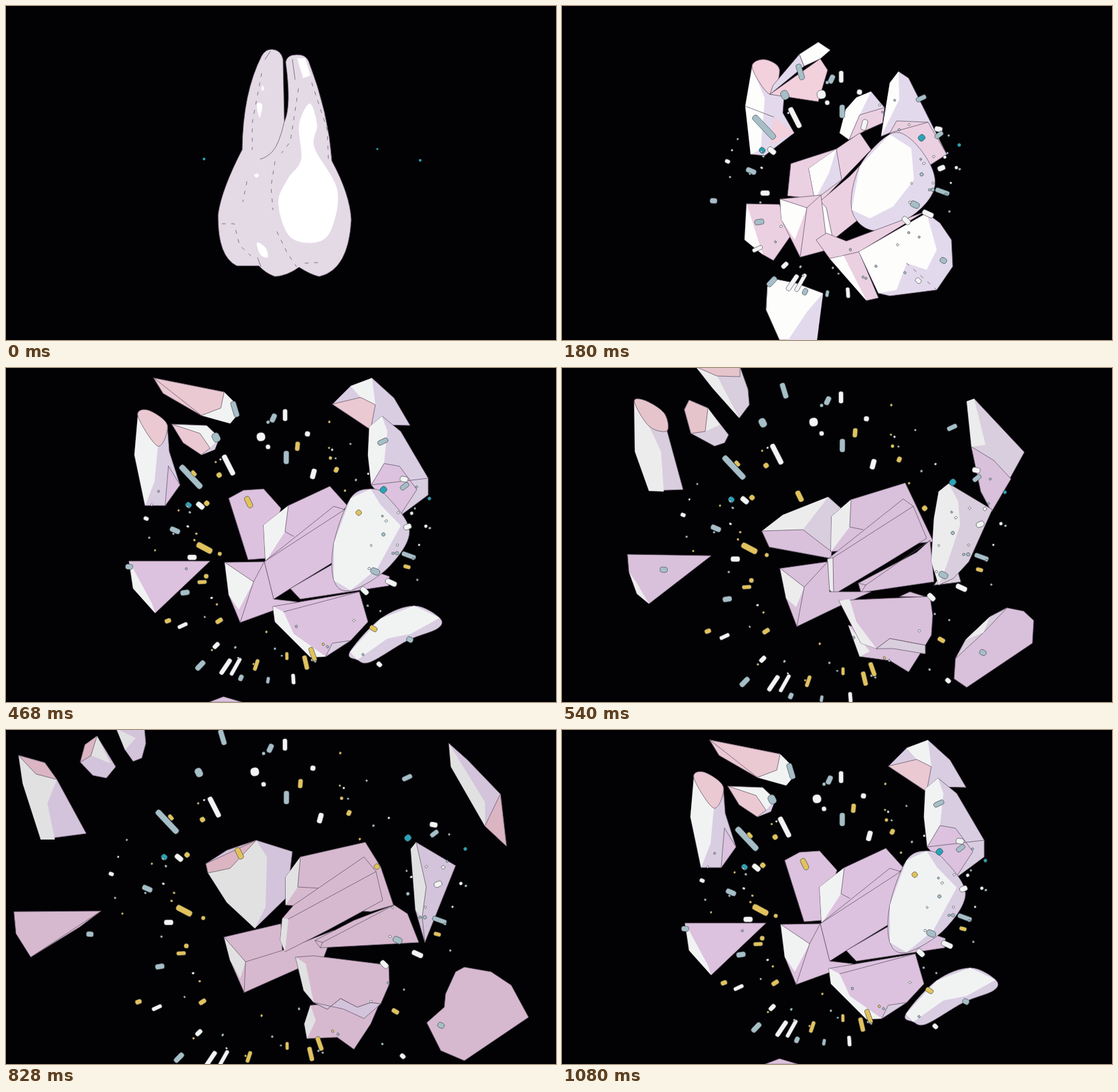
An HTML page for the animation above (1.26 s loop, 822 by 500 pixels).

```html
<!DOCTYPE html>
<html lang="en">
<head>
<meta charset="utf-8">
<title>Bursting tooth</title>
<style>
html, body { margin: 0; width: 100%; height: 100%; overflow: hidden; background: #020104; }
svg { display: block; width: 100vw; height: 100vh; }
path { stroke-width: .8; stroke-linejoin: round; stroke-linecap: round; }
.ink { stroke: #67586b; }
.chip { stroke: #3c4448; stroke-width: .6; }
</style>
</head>
<body>
<svg id="stage" viewBox="0 0 822 500"></svg>
<script>
const STEP = 180, ORDER = [0, 1, 2, 3, 4, 3, 2];
const COLORS = { w: '#f4f4f4', b: '#a6bec7', y: '#e2c25c', t: '#2aa3b8' };
const stage = document.getElementById('stage');
const layers = [];
let layer, tones;

function add(parent, tag, attrs) {
  const el = document.createElementNS('http://www.w3.org/2000/svg', tag);
  for (const key in attrs) el.setAttribute(key, attrs[key]);
  return parent.appendChild(el);
}

// Tones: white, lilac, pink, rose.
function scene(w, l, p, r) {
  tones = { w, l, p, r };
  layer = add(stage, 'g', { visibility: 'hidden' });
  layers.push(layer);
}

// A capital kind has an inked edge; '-' is a line, '=' a dashed line.
function draw(kind, d) {
  const fill = tones[kind.toLowerCase()];
  const inked = !fill || kind !== kind.toLowerCase();
  add(layer, 'path', {
    d: fill ? d + 'Z' : d, fill: fill || 'none', class: inked ? 'ink' : '',
    'stroke-dasharray': kind === '=' ? '5 9' : 'none'
  });
}

// Closed Catmull-Rom curve.
function smooth(pts) {
  const at = i => pts[(i + pts.length) % pts.length];
  const mix = (p, a, b) => p.map((v, k) => v + (a[k] - b[k]) / 6);
  return 'M' + pts[0] + pts.map((p, i) => {
    const q = at(i + 1);
    return 'C' + [mix(p, q, at(i - 1)), mix(q, p, at(i + 2)), q];
  }).join('');
}

// Corners are lettered a, b, c…; each face names its kind, ':' sharp or '~' soft, and its corners.
function piece(corners, faces) {
  const pts = corners.split(' ').map(p => p.split(',').map(Number));
  for (const face of faces.split(' ')) {
    const ring = [...face.slice(2)].map(c => pts[c.charCodeAt(0) - 97]);
    draw(face[0], face[1] === '~' ? smooth(ring) : 'M' + ring.join('L'));
  }
}

scene('#ffffff', '#e4dae6', '#e9cfe0', '#f0cfda');
draw('L', 'M353,215Q354,130 382,75Q388,64 398,65Q411,66 414,80L416,173Q427,150 418,84Q420,73 434,73Q447,72 452,82Q482,160 487,232Q514,282 516,320Q512,395 468,405Q455,402 438,391Q420,404 402,405Q388,400 378,389L345,389Q316,375 317,312Q322,275 353,215');
draw('-', 'M416,173Q408,208 398,218Q388,228 380,229');
piece('435,78 447,78 455,104 444,108', 'w:abcd');
piece('454,146 465,178 461,212 495,275 486,335 462,354 424,345 407,295 421,259 441,230 438,178', 'w~abcdefghijk');
piece('375,147 383,148 379,167 383,119 386,124 382,127', 'w~abc w~def');
piece('375,251 378,254 374,257 371,253', 'w~abcd');
piece('375,354 388,362 391,376 380,372', 'w~abcd');
piece('395,68 387,80 428,80 432,110 376,377 381,390', '-:ab -:cd -:ef');
draw('=', 'M382,101L368,175V215M437,124L425,203 412,220M402,233L396,270 399,305M360,263L354,293M323,326H341L349,358 366,374M405,338L420,369 434,390M447,385L466,384M457,115L480,185 482,235');

scene('#fdfdfc', '#e3d9ec', '#ebd0e2', '#f2d0dc');
piece('284,92 302,80 325,95 311,132 332,134 330,160 347,190 303,224 282,222 274,150 303,138 297,215 316,166 312,208', 'L:abcdefghij w:ajilk R~abcd r:mgn -:jm');
piece('316,118 355,72 383,54 401,66 397,96 383,143 311,132 386,79 362,90', 'L:abig W:bcdhi R:ghef');
piece('415,190 424,155 440,137 462,128 482,152 479,175 452,187 429,200 445,163', 'L:abcdefgh w:abcdih P:hiefg');
piece('477,195 490,115 503,98 518,108 575,222 550,238 520,215 490,190 500,172 547,174 504,140', 'L:abcdefgh w:abck P:hijefg -:jh');
piece('337,284 342,236 410,214 445,190 462,215 390,290 369,243 418,260 378,290 399,250', 'P:abcdef L:gchi w:gcji');
piece('386,292 430,255 490,192 440,322 405,350 389,345 395,302', 'P:abcdef W:agef');
piece('490,192 522,200 553,243 554,280 520,316 465,336 433,305 445,240 522,213 526,260 495,300 460,318', 'L~abcdefgh w:aijklgh');
piece('276,296 325,297 341,345 316,381 273,350 300,372', 'P:abcdfe w:afe');
piece('326,289 387,283 397,365 356,376 328,320 366,302 348,350', 'P:abcde w:afge -:afb -:fd');
piece('380,350 395,340 425,352 470,335 542,308 444,368 473,437 455,441 400,378 420,372', 'P:abcdefghi w:ijh -:if');
piece('444,368 545,310 565,325 582,350 584,390 560,425 490,434 473,430 560,365 545,395 515,385 500,425', 'L:abcdefgh w:abijklh =:kf');
piece('307,420 320,409 350,415 390,430 381,500 325,500 305,455 366,458 338,500', 'W:abcdefg l:dhie');

scene('#f1f3f3', '#d9cde2', '#dcc2de', '#ebc9d2');
piece('221,15 326,36 340,50 346,70 335,83 292,71 235,38 321,60', 'L:abcdefg w:bcdefh R:abhfg -:af');
piece('248,84 300,86 319,104 312,122 292,130 265,112 305,120 290,98', 'W:abcdef l:cdeg R:ahgef');
piece('192,130 197,72 212,63 241,85 244,125 260,175 238,206 208,206 227,117 222,170 243,147', 'L:abcdefgh w:abijh R~bcdi P:kfg');
piece('488,54 515,27 547,15 580,45 604,86 560,85 545,92 530,44 552,55', 'L:abcdefg w:bcih R:ahig');
piece('541,130 543,88 562,72 590,95 631,165 631,190 588,222 546,175 565,143 588,147 614,182 570,95', 'L:abcdefgh w:abclih P:hijkg -:eh');
piece('333,195 355,183 385,181 411,210 388,285 362,287', 'P:abcdef');
piece('385,235 422,206 484,177 511,207 420,270 388,290 417,245 430,252', 'P:abcdef w:abgf -:bgh');
piece('425,330 500,287 573,312 572,326 440,346', 'P:abcde');
piece('386,290 430,255 490,207 506,212 507,230 490,290 425,330 400,346 390,340', 'P:abcdefghi W:ahi -:ad');
piece('490,262 515,195 545,181 570,193 603,245 570,300 515,333 490,318 560,205 590,236 555,300', 'L~abcdefgh w:abcijkgh');
piece('184,289 305,289 223,367 190,330 218,352', 'P:abcd w:aecd');
piece('327,291 386,290 400,346 435,350 350,381 333,340 370,320 348,362', 'P:abcdef w:aghf -:agb -:ge');
piece('399,357 528,335 541,380 515,408 478,432 455,433 402,380 415,365 430,398 488,412', 'P:abcdefg w:ahiefg L:jde -:hb');
piece('514,425 560,375 610,356 648,374 645,390 600,408 545,440 525,437 605,398 570,405', 'L~abcdefgh w:abcdijh');
piece('304,500 325,492 352,500', 'P:abc');

scene('#ececed', '#d9cedd', '#d9c0db', '#e6c4cb');
piece('200,-2 266,-2 278,32 280,55 265,75 225,30 258,62 232,12 266,13', 'L:abcdef w:ahgef R:abih');
piece('183,62 190,48 218,60 249,100 243,112 228,117 193,98 214,95 236,85', 'L:abcdefg w:cih R:abchg');
piece('108,50 125,49 153,68 157,94 181,182 130,184 109,125 148,125 152,185 130,87', 'L:abcdefg w:ajhifg R~abcdj');
piece('605,50 616,46 691,126 642,215 626,185 612,118 645,138 671,166 633,115', 'L:abcdef w:abif P:fghde');
piece('299,244 330,220 398,193 417,210 402,285 310,268 360,242 403,275', 'L:abcdhef w:abcg P:aghef');
piece('403,222 432,197 513,172 555,260 402,275 430,238 450,242', 'P:abcde w:abfe -:bfg');
piece('443,322 530,276 550,258 556,320 447,336 454,325', 'P:abcde -:afe -:fc');
piece('397,286 510,196 525,207 545,255 480,295 406,339 398,330 405,284', 'P:abcdefg W:ahfg -:hc');
piece('556,325 565,312 592,306 596,320', 'L:abcd');
piece('556,225 563,185 578,173 643,212 608,290 585,315 563,325 552,290 592,200 595,235 575,295', 'L:abcdefgh w:abcijkgh');
piece('98,279 223,281 130,353 100,305 112,338 112,322', 'P:abced w:dfce');
piece('326,300 397,290 400,335 462,335 411,358 351,387 335,345 362,328 350,358', 'P:abcdefg w:ahig -:ahb -:hf');
piece('505,342 520,335 545,343', 'P:abc');
piece('428,385 540,420 518,455 490,438 445,432 460,424', 'P:abcde w:afe');
piece('414,348 550,342 554,370 552,400 543,415 490,405 470,420 447,412 430,346 440,380 543,428 495,420', 'P:abcdefgh w:aijgh L:gfekl');
piece('586,465 588,435 603,407 640,372 665,359 690,364 705,378 703,412 605,478 630,396', 'P:abcdefghi L:bcdej w:cdj');

scene('#e1e1e2', '#d3c3db', '#d7b9cf', '#dbb5c2');
piece('165,-2 207,-2 209,20 203,42 190,47 178,30 194,12', 'L:abcdef w:agf');
piece('111,48 118,22 136,9 164,55 150,72 130,68 127,38 156,50', 'L:abcdef w:chg R:abcg');
piece('19,38 58,49 76,74 120,155 52,164 25,80 62,110 73,164 45,66', 'L:abcdef w:aicghef R:abci');
piece('662,20 690,45 739,96 748,174 716,144 665,55 716,108', 'L:abcdef w:agef R:cde');
piece('299,200 330,180 374,165 428,182 420,250 372,297 330,258 390,190 388,265 335,207 302,214', 'L:abcdefgk w:kchifg R:acjk');
piece('418,220 440,190 537,168 560,205 579,262 545,272 418,262 436,235 470,237', 'P:abcdefg w:abhg -:bhi');
piece('326,310 411,290 413,330 490,300 475,340 430,360 356,393 335,345 358,347 350,372', 'P:abcdefgh w:aijh -:aic -:ig');
piece('413,282 430,262 535,190 553,212 563,255 480,300 417,332 410,315 422,283', 'P:abcdefgh w:aigh -:id');
piece('462,315 520,285 580,262 600,275 617,318 470,326 473,318', 'P:abcdef -:agf -:gc');
piece('605,178 613,168 672,203 626,318 612,270 628,235 622,280', 'L:abcde w:abfge -:bfgd');
piece('12,272 142,271 110,295 37,340 15,305', 'P:abcde -:db');
piece('446,440 455,412 560,405 545,440 520,478 495,460 450,462 463,435', 'P:abcdefg w:abhg');
piece('433,340 460,338 572,352 573,380 560,410 545,408 525,415 500,402 480,418 460,408 445,390 448,350 535,432 505,418', 'P:abcdefghijk w:aljk L:jihgfemn');
piece('629,438 655,415 657,395 672,362 685,355 725,362 755,382 781,430 685,495 650,480', 'P:abcdefghij');

// Chips fly outward along rays; every layer shows the same cloud at another spread.
const SPREAD = [0, .72, .88, 1, 1.1], MID = { x: 418, y: 265 }, TILT_Y = 320;

function chip(hue, x, y, len, wide, turn) {
  turn = turn ?? Math.atan2(y - TILT_Y, x - MID.x) * 180 / Math.PI;
  layers.forEach((g, i) => {
    if (!i || (hue === 'y' && i === 1)) return;
    const s = SPREAD[i];
    const px = MID.x + (x - MID.x) * s, py = MID.y + (y - MID.y) * s;
    add(g, 'rect', {
      x: -len / 2, y: -wide / 2, width: len, height: wide, rx: Math.min(len, wide) * .42,
      fill: COLORS[hue], class: 'chip', transform: `translate(${px} ${py}) rotate(${turn})`
    });
  });
}

function chips(hue, specs) {
  for (const spec of specs.split(' ')) {
    const [x, y, len = 5, wide = len, turn] = spec.split(',').map(Number);
    chip(hue, x, y, len, wide, turn);
  }
}

chips('w', '417,44,18,7 455,76,8 376,81,13 388,98,7 321,129,34,8 465,144,16,8 181,220,8,6 273,198,14,8 259,286,14,8,0 243,402,16,6 300,436,12,7 316,472,28,7 333,472,30,6 431,493,16,6 577,468,9,7 552,343,14,8,45 597,329,18,8,25 619,153,12,8,10 625,234,12,8 656,233 632,211');
chips('b', '332,34,24,8 397,49,14,8,-65 388,56 300,82,14,11 419,116,20,8 257,149,46,9 583,89,16,7,-25 230,240,16,8 152,302,11,8 247,346,14,8 273,470,18,8 342,491,10,7 388,495,10,5 620,165,14,7 627,283,22,7,20 570,310,14,9,25 584,247 629,426,10,8 607,279');
chips('y', '438,97,14,7 494,117 504,137,9,7 305,146,8 262,143,10,6 355,192,18,8 284,194,8 280,270,26,9,28 306,280,6 283,318,7 276,328,14,6 305,394,12,7 218,394,10,7 420,454,12,5 464,451,22,7 452,465,22,7 368,469,18,6 567,407,12,7 542,210,8 624,302,11,6,15');
chips('t', '253,197,9,8 584,171,10,9 662,186');

// Fine dust, seeded so it is the same on every load.
let seed = 11;
const rand = () => (seed = seed * 16807 % 2147483647) / 2147483647;
for (let i = 0; i < 54; i++) {
  const a = rand() * Math.PI * 2, d = 130 + rand() * 95;
  chip('wbby'[i % 4], MID.x + Math.cos(a) * d * 1.1, MID.y + Math.sin(a) * d, 2.5 + rand() * 1.7, 3.2);
}

for (const [x, y, r] of [[296, 229, 2], [555, 214, 1.6], [619, 231, 2]]) {
  add(layers[0], 'circle', { cx: x, cy: y, r, fill: COLORS.t });
}

function render(ms) {
  const now = ORDER[Math.floor(ms / STEP) % ORDER.length];
  layers.forEach((g, i) => g.setAttribute('visibility', i === now ? 'visible' : 'hidden'));
}

const start = performance.now();
function tick() {
  render(performance.now() - start);
  requestAnimationFrame(tick);
}
tick();
</script>
</body>
</html>
```
